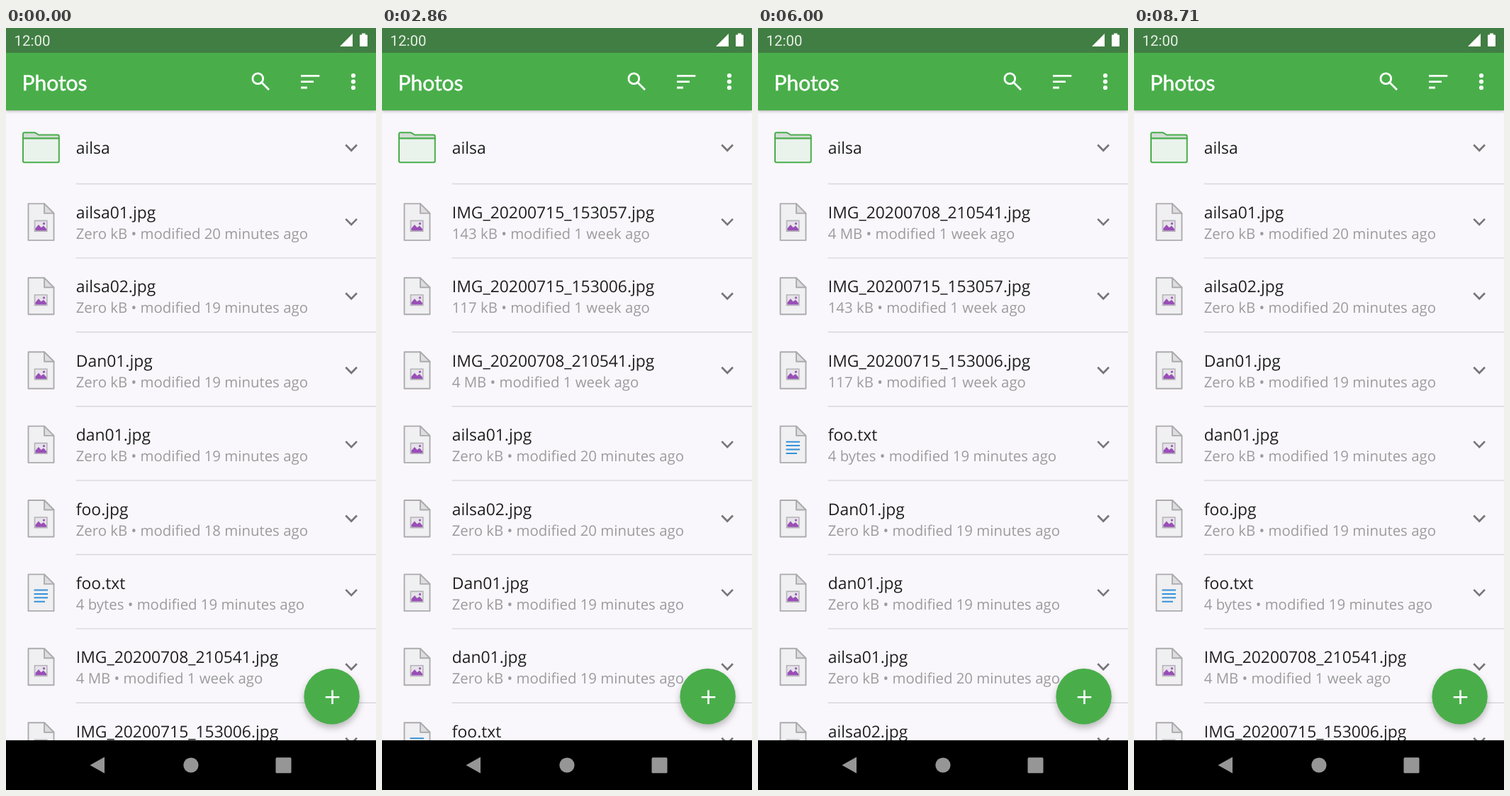
An HTML page for the animation above (9010 ms loop, 522 px wide and 1073 px high).

```html
<!DOCTYPE html>
<html lang="en">
<head>
<meta charset="utf-8">
<title>Sorting a photo list</title>
<style>
  html, body { margin: 0; width: 100%; height: 100%; overflow: hidden; background: #000; }
  svg { display: block; }
  text { font-family: "Open Sans", sans-serif; fill: #1f1f21; text-rendering: geometricPrecision; }
  .name { font-size: 22.87px; }
  .info { font-size: 20.4px; fill: #9c9b9e; }
  .item { font-size: 23.3px; }
  .glyph { font: 700 19px Roboto, sans-serif; fill: #929195; text-anchor: middle; }
  .white { stroke: #fff; fill: none; }
  #menu { filter: drop-shadow(0 5px 7px rgba(0, 0, 0, .3)); }
  #fab { filter: drop-shadow(0 5px 5px rgba(0, 0, 0, .26)); }
  #bar { filter: drop-shadow(0 1px 2px rgba(0, 0, 0, .3)); }
</style>
</head>
<body>
<svg width="522" height="1073" viewBox="0 0 522 1073">
  <defs>
    <clipPath id="reveal"><rect id="revealBox"/></clipPath>
    <clipPath id="rowClip"><rect id="rowBox" x="238" width="284" height="69.6"/></clipPath>
    <g id="page" stroke="#acabae" stroke-width="1.9" stroke-linejoin="round">
      <path d="M31.5-25.5H54L67.5-12V26H31.5Z" fill="#f0eff1"/>
      <path d="M54-25.5V-12H67.5Z" fill="#dddcde"/>
    </g>
    <g id="image">
      <use href="#page"/>
      <path d="M40.5-1.5H57.8V13.2H40.5Z" fill="#e6e3e9" stroke="#b4b3b7" stroke-width="1.6"/>
      <path d="M41.5 12.3V9L46 4L49.5 8L53 5.5L57 10V12.3Z" fill="#994fb7"/>
      <circle cx="53.5" cy="2.5" r="1.6" fill="#994fb7"/>
    </g>
    <g id="doc">
      <use href="#page"/>
      <path d="M39.5-3.4H59M39.5 2H59M39.5 7.4H59M39.5 12.8H55" stroke="#3492da" stroke-width="2"/>
    </g>
    <g id="folder" stroke="#4aae4c" stroke-width="2" stroke-linejoin="round">
      <path d="M24-13V-19Q24-21.2 26-21.2H41L46-18H73Q74.8-18 74.8-16V-13Z" fill="#d3ddd5"/>
      <path d="M24-13H74.8V19Q74.8 20.8 73 20.8H26Q24 20.8 24 19Z" fill="#eaf2ec"/>
    </g>
    <path id="chevron" d="M479.3-4L487.2 4L495-4" fill="none" stroke="#777679" stroke-width="2.7"/>
  </defs>

  <rect width="522" height="1073" fill="#f9f7fb"/>
  <g id="list"></g>

  <g id="fab">
    <circle cx="459.6" cy="941.3" r="39.2" fill="#49ae4a"/>
  </g>
  <path class="white" d="M450.7 942.3H470.3M460.5 932.5V952.1" stroke-width="2.6"/>

  <rect id="bar" y="35" width="522" height="81" fill="#49ae4a"/>
  <text x="22.5" y="88" style="font: 30px Lato, sans-serif; fill: #fff; stroke: #fff; stroke-width: .5">Photos</text>
  <g class="white" stroke-width="2.8">
    <circle cx="355.3" cy="71.3" r="7.4"/>
    <path d="M361 77L371 87M416 67.3H442.3M416 75.6H434M416 84H425"/>
  </g>
  <g fill="#fff">
    <circle cx="490" cy="67" r="3.1"/><circle cx="490" cy="75.5" r="3.1"/><circle cx="490" cy="84" r="3.1"/>
  </g>

  <g id="menu">
    <g clip-path="url(#reveal)">
      <rect x="238" y="41" width="284" height="417.5" rx="2" fill="#f9f7fb"/>
      <g clip-path="url(#rowClip)"><circle id="ripple" cx="380.3" opacity=".125"/></g>
      <g id="items"></g>
    </g>
  </g>

  <rect width="522" height="35" fill="#417e43"/>
  <text x="11.5" y="25" style="font: 20.5px Roboto, sans-serif; fill: #e6efe6">12:00</text>
  <path d="M471 26H489V8ZM499 10.5Q499 9.5 500 9.5H502V7.5H507V9.5H509Q510 9.5 510 10.5V25Q510 26 509 26H500Q499 26 499 25Z" fill="#fff"/>

  <rect y="1003" width="522" height="70"/>
  <g fill="#969696">
    <path d="M118.5 1038L139 1026.5V1049.5Z"/>
    <circle cx="261" cy="1038" r="10.6"/>
    <rect x="380.5" y="1027.3" width="22" height="22" rx="1.5"/>
  </g>
</svg>
<script>
const LOOP = 9010, FPS = 7, ROW = 104.4, ITEM = 69.6;
const $ = id => document.getElementById(id);
const set = (id, attrs) => { for (const key in attrs) $(id).setAttribute(key, attrs[key]); };
const lerp = (a, b, t) => a + (b - a) * t;

// File list: each row has a name, a size and an age.
const minutes = n => `${n} minutes ago`;
const week = '1 week ago';
const files = {
  a1: ['ailsa01.jpg', 'Zero kB', minutes(20)],
  a2: ['ailsa02.jpg', 'Zero kB', minutes(20)],
  a2early: ['ailsa02.jpg', 'Zero kB', minutes(19)],
  D: ['Dan01.jpg', 'Zero kB', minutes(19)],
  d: ['dan01.jpg', 'Zero kB', minutes(19)],
  foo: ['foo.jpg', 'Zero kB', minutes(19)],
  fooEarly: ['foo.jpg', 'Zero kB', minutes(18)],
  txt: ['foo.txt', '4 bytes', minutes(19)],
  i8: ['IMG_20200708_210541.jpg', '4 MB', week],
  i06: ['IMG_20200715_153006.jpg', '117 kB', week],
  i57: ['IMG_20200715_153057.jpg', '143 kB', week]
};
const orders = [
  'a1 a2early D d fooEarly txt i8 i06',
  'i57 i06 i8 a1 a2 D d txt',
  'i8 i57 i06 txt D d a1 a2',
  'a1 a2 D d foo txt i8 i06'
];

const row = (i, icon, text) => `<g transform="translate(0 ${168.5 + ROW * i})">
  <use href="#${icon}"/><use href="#chevron"/>${text}
  <path d="M98.5 51H522" stroke="#d8d7da" stroke-width="1.4"/></g>`;

function fileRow(key, i) {
  const [name, size, age] = files[key];
  return row(i + 1, key === 'txt' ? 'doc' : 'image',
    `<text class="name" x="98.8" y="-5">${name}</text>
     <text class="info" x="98.7" y="24">${size} • modified ${age}</text>`);
}

$('list').innerHTML = orders.map(order => '<g>' +
  row(0, 'folder', '<text class="name" x="98.8" y="8.5">ailsa</text>') +
  order.split(' ').map(fileRow).join('') + '</g>').join('');

// Sort menu
const pair = (top, bottom) =>
  `<text class="glyph" x="273.5" y="-2">${top}</text><text class="glyph" x="273.5" y="15">${bottom}</text>`;
const boxes = d => `<path d="${d}" fill="none" stroke="#929195" stroke-width="3"/>`;
const items = [
  ['A - Z', pair('A', 'Z')],
  ['Z - A', pair('Z', 'A')],
  ['Newest first', pair(1, 9)],
  ['Oldest first', pair(9, 1)],
  ['Biggest first', boxes('M267.5-14H283V-3H267.5ZM267.5 6H278V13.5H267.5Z')],
  ['Smallest first', boxes('M267.5-13.5H278V-6H267.5ZM267.5 2H283V13H267.5Z')]
];
const itemY = i => 75.8 + ITEM * i;

$('items').innerHTML = items.map(([label, icon], i) => `<g transform="translate(0 ${itemY(i)})">
  <path d="M256.5-16V13M251.5 9L256.5 14.2L261.5 9" fill="none" stroke="#929195" stroke-width="3"/>
  ${icon}<text class="item" x="${i < 4 ? 290.3 : 294.8}" y="8.3">${label}</text></g>`).join('');

// Each visit: the step at which the button is tapped, the step of the choice, the chosen item.
const visits = [[9, 16, 3], [27, 34, 4], [45, 52, 0]];

function drawMenu(step) {
  const visit = visits.find(([open, pick]) => step >= open + 2 && step < pick + 3);
  $('menu').style.display = visit ? '' : 'none';
  if (!visit) return;
  const [open, pick, item] = visit;
  // The menu slides and unclips away from the sort button.
  const rest = [.28, .004][step - open - 2] || 0;
  set('menu', {
    transform: `translate(${49 * rest} ${-173 * rest})`,
    opacity: step === pick + 2 ? .5 : 1
  });
  set('revealBox', {
    x: lerp(238, 368, rest), y: lerp(41, 237, rest),
    width: lerp(284, 24, rest), height: lerp(417.5, 24, rest)
  });
  set('rowBox', { y: itemY(item) - ITEM / 2 });
  set('ripple', { cy: itemY(item), r: step < pick ? 0 : step === pick ? 118.5 : 160 });
}

function draw() {
  const step = Math.floor((performance.now() % LOOP + 5) * FPS / 1000);
  const sorted = visits.filter(([, pick]) => step >= pick + 2).length;
  [...$('list').children].forEach((list, i) => { list.style.display = i === sorted ? '' : 'none'; });
  drawMenu(step);
  requestAnimationFrame(draw);
}
draw();
</script>
</body>
</html>
```
